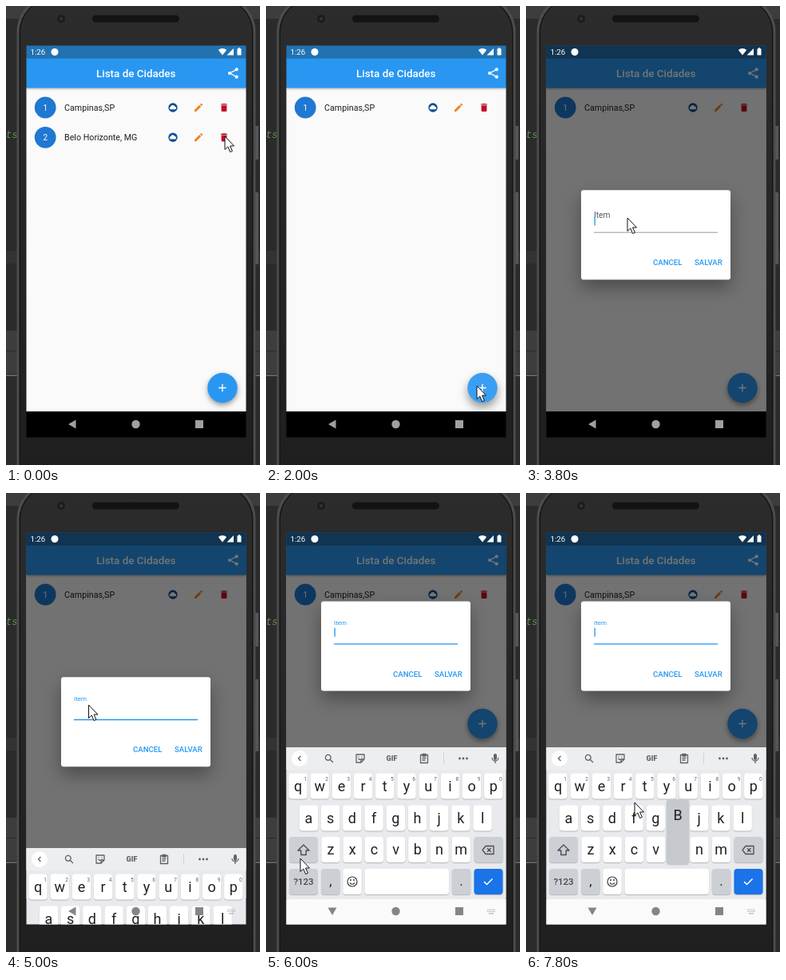
These frames come from a looping animation (318 px wide and 574 px high, 8 s). An HTML page with a canvas:

```html
<!DOCTYPE html>
<html lang="pt">
<head>
<meta charset="utf-8">
<style>
html, body { margin: 0; width: 100%; height: 100%; overflow: hidden; background: #2b2b2b; }
canvas { display: block; width: 318px; height: 574px; }
</style>
</head>
<body>
<canvas id="stage"></canvas>
<script>
const W = 318, H = 574, LOOP = 8000, STEP = 200;
const LEFT = 25, WIDTH = 277;
const BLUE = '#2196f3', BAR = '#2997f1';
const canvas = document.getElementById('stage');
const ctx = canvas.getContext('2d');
const dpr = window.devicePixelRatio || 1;
canvas.width = W * dpr;
canvas.height = H * dpr;

// Each key is [time, value...]; eased between keys.
const pointer = [
  [800, 274, 163], [1400, 258, 320], [1800, 254, 470], [2000, 264, 475],
  [2200, 264, 475], [3200, 127, 265], [3800, 127, 265], [4800, 103.5, 265],
  [5000, 103.5, 265], [6000, 43, 457], [6200, 43, 457], [7200, 188, 448],
  [7600, 188, 448], [7800, 136, 387]
];
const keyboardDrop = [[4600, 222], [4800, 200], [5000, 126], [5200, 25], [5400, 0]];
const bodyInset = [[5000, 0], [5600, 1]];

function track(keys, t) {
  if (t <= keys[0][0]) return keys[0].slice(1);
  for (let i = 1; i < keys.length; i++) {
    const a = keys[i - 1], b = keys[i];
    if (t <= b[0]) {
      const u = (t - a[0]) / (b[0] - a[0]), e = u * u * (3 - 2 * u);
      return a.slice(1).map((v, k) => v + (b[k + 1] - v) * e);
    }
  }
  return keys[keys.length - 1].slice(1);
}

function rect(x, y, w, h, color, r = 0) {
  ctx.fillStyle = color;
  ctx.beginPath();
  ctx.roundRect(x, y, w, h, r);
  ctx.fill();
}

function disc(x, y, r, color) {
  ctx.fillStyle = color;
  ctx.beginPath();
  ctx.arc(x, y, r, 0, 7);
  ctx.fill();
}

function text(str, x, y, size, color, { weight = 400, align = 'left', family = 'Roboto, sans-serif', style = '' } = {}) {
  ctx.font = `${style} ${weight} ${size}px ${family}`;
  ctx.textAlign = align;
  ctx.textBaseline = 'alphabetic';
  ctx.fillStyle = color;
  ctx.fillText(str, x, y);
}

const centered = { align: 'center' };

function shape(path, x, y, color, { line = 0 } = {}) {
  ctx.save();
  ctx.translate(x, y);
  const p = new Path2D(path);
  if (line) {
    ctx.strokeStyle = color;
    ctx.lineWidth = line;
    ctx.lineJoin = 'round';
    ctx.stroke(p);
  } else {
    ctx.fillStyle = color;
    ctx.fill(p);
  }
  ctx.restore();
}

function withShadow(blur, dy, color, draw) {
  ctx.save();
  ctx.shadowBlur = blur * dpr;
  ctx.shadowOffsetY = dy * dpr;
  ctx.shadowColor = color;
  draw();
  ctx.restore();
}

function drawDesk() {
  rect(0, 0, W, H, '#2b2b2b');
  rect(0, 0, W, 16, '#3b3c3c');
  rect(0, 306, W, 16, '#353331');
  rect(0, 406, W, 54, '#3c3d3d');
  rect(0, 431, W, 1, '#2b2b2b');
  rect(0, 461, W, 2, '#606060');
  rect(312, 150, 4, 42, '#555657');
  rect(312, 233, 4, 90, '#555657');
  text('ts', 0, 165, 12, '#629155', { style: 'italic', family: '"Liberation Mono", monospace' });
}

function drawPhone() {
  rect(13.5, -13, 299, 640, '#4c4c4c', 45);
  rect(16.5, -10, 293, 640, '#141414', 43);
  const body = ctx.createLinearGradient(0, 0, 0, H);
  body.addColorStop(0, '#2c2c2c');
  body.addColorStop(1, '#1f1f1f');
  rect(18, -9, 290, 640, body, 42);
  disc(69, 16, 5, '#1c1c1c');
  disc(69, 16, 2, '#33363a');
  rect(108, 11.5, 109, 9, '#131313', 4.5);
}

function drawShare(x, y) {
  shape('M4.5-4.7L-4.5 0L4.5 4.7', x, y, '#fff', { line: 1.4 });
  for (const [dx, dy] of [[4.2, -4.7], [-4.5, 0], [4.2, 4.7]]) disc(x + dx, y + dy, 2.1, '#fff');
}

function drawRow(index, name, y) {
  disc(49.2, y, 13.4, '#1f78d1');
  text(index, 49.2, y + 3.5, 10, '#fff', centered);
  text(name, 73, y + 3.6, 10.7, '#202020');
  disc(209, y, 5.7, '#0d4f92');
  shape('M-3 2.2a1.7 1.7 0 0 1 0-3.3a3 3 0 0 1 5.5-.2a1.8 1.8 0 0 1 .4 3.5z', 209, y, '#fff');
  shape('M-5 5V2.9L1.2-3.3L3.3-1.2L-2.9 5zM1.9-4L3-5.1H3.8L5.1-3.8V-3L4-1.9z', 241, y, '#ee8322');
  shape('M-3.4-2.8H3.4V4A1.1 1.1 0 0 1 2.3 5.1H-2.3A1.1 1.1 0 0 1-3.4 4zM-4-4.5H-2L-1.4-5H1.4L2-4.5H4V-3.4H-4z', 273, y, '#c00d25');
}

function drawAddButton(t, inset) {
  const y = 477.5 - 189 * inset;
  const pressed = t >= 2000 && t < 2600;
  const color = pressed ? '#3a9ff2' : BAR;
  withShadow(pressed ? 11 : 6, pressed ? 6 : 3, 'rgba(0,0,0,.4)', () => disc(271, y, 18.7, color));
  rect(266.2, y - .7, 9.4, 1.4, '#fff');
  rect(270.2, y - 4.7, 1.4, 9.4, '#fff');
}

function drawApp(t, inset) {
  rect(LEFT, 102, WIDTH, 405, '#fafafa');
  withShadow(3, 1.5, 'rgba(0,0,0,.32)', () => rect(LEFT, 65, WIDTH, 37.4, BAR));
  rect(LEFT, 49, WIDTH, 16.7, '#2272b2');
  text('Lista de Cidades', 113, 89, 13.4, '#fff', { weight: 500 });
  drawShare(284.5, 84);
  drawRow('1', 'Campinas,SP', 127);
  if (t < 600) drawRow('2', 'Belo Horizonte, MG', 164.3);
  drawAddButton(t, inset);
}

function drawStatus() {
  text('1:26', 30.5, 61.3, 9.7, '#fff');
  disc(61, 57.5, 4.5, '#fff');
  shape('M0 4.5L-5.2-2A8 8 0 0 1 5.2-2z', 271, 57, '#fff');
  shape('M-4 4.5L4.5-4V4.5z', 280.5, 57, '#fff');
  rect(289.5, 53.3, 5, 8.2, '#fff', .6);
  rect(291, 52.3, 2, 1.2, '#fff');
}

function drawDialog(t, inset) {
  const y = 230.2 - 94.6 * inset;
  withShadow(22, 10, 'rgba(0,0,0,.34)', () => rect(69, y, 187, 112, '#fff', 3));
  if (t < 3800) text('Item', 85, y + 37.5, 10.7, '#666');
  else if (t < 4000) text('Item', 85, y + 35.2, 10.2, '#555');
  else text('Item', 85, y + 29.3, 8, BLUE);
  const focused = t >= 4000;
  rect(85, y + 52.6, 155, focused ? 1.4 : .8, focused ? BLUE : '#777');
  const caret = (t >= 3800 && t < 4200) || (t >= 5800 && t < 6600) || t >= 7800;
  if (caret) rect(85.5, y + 33.2, 1.3, 11, BLUE);
  text('CANCEL', 159, y + 94.2, 9.6, BLUE, { weight: 500 });
  text('SALVAR', 211, y + 94.2, 9.6, BLUE, { weight: 500 });
}

function drawKey(x, y, w, color) {
  withShadow(1, 1, 'rgba(0,0,0,.22)', () => rect(x, y, w, 32, color, 4));
}

function drawToolbar() {
  const gray = '#5f6368';
  const line = { line: 1.3 };
  disc(42, 332, 10, '#fff');
  shape('M1.5-3L-1.5 0L1.5 3', 42, 332, gray, line);
  shape('M2.2-1.2A3.4 3.4 0 1 1-4.6-1.2A3.4 3.4 0 1 1 2.2-1.2M1.3 1.3L5 5', 79, 332, gray, line);
  shape('M-5-5H5V1L1 5H-5zM5 1H1V5M-2.5 0Q0 3 2.5 0M-2-2.5V-1.5M2-2.5V-1.5', 118, 332, gray, line);
  text('GIF', 157.5, 335.3, 9, gray, { align: 'center', weight: 900 });
  shape('M-4.5-4.5H4.5V5.5H-4.5zM-2-5.5H2V-3H-2zM-2.5-.5H2.5M-2.5 2H1.5', 198, 332, gray, line);
  rect(222, 325, 1, 14, '#d0d3d7');
  for (const dx of [-4.5, 0, 4.5]) disc(247 + dx, 332, 1.4, gray);
  rect(285, 326, 4, 8, gray, 2);
  shape('M-4-1A4 4 0 0 0 4-1M0 3V6', 287, 332, gray, line);
}

function drawKeyboard(t, drop) {
  const caps = t >= 6200 && t < 7800;
  const dark = '#ccd0d5', ink = '#202124';
  ctx.save();
  ctx.translate(0, drop);
  rect(LEFT, 318, WIDTH, 222, '#e8eaed');
  rect(LEFT, 318, WIDTH, 28, '#eceef0');
  drawToolbar();

  const rows = [['qwertyuiop', 40, 350.5], ['asdfghjkl', 53.5, 390.5], ['zxcvbnm', 81, 430]];
  rows.forEach(([letters, start, y], row) => {
    [...letters].forEach((letter, i) => {
      const x = start + i * 27.2;
      drawKey(x - 11.7, y, 23.4, '#fff');
      text(caps ? letter.toUpperCase() : letter, x, y + 22.3, 18, ink, centered);
      if (!row) text((i + 1) % 10, x + 9, y + 9, 6.5, '#5f6368', centered);
    });
  });

  drawKey(29, 430, 36, dark);
  shape('M0-6.5L7 .5H3.2V6H-3.2V.5H-7z', 47, 446.5, '#4a4d51', { line: caps ? 0 : 1.4 });
  drawKey(260.5, 430, 36, dark);
  shape('M-7 0L-3-5H7V5H-3zM-1-2.3L3.6 2.3M3.6-2.3L-1 2.3', 278, 446.5, '#4a4d51', { line: 1.3 });

  drawKey(29, 470, 36, dark);
  text('?123', 47, 490, 11.5, '#44474b', { align: 'center', weight: 500 });
  drawKey(69, 470, 23.5, dark);
  text(',', 81, 491, 17, ink, centered);
  drawKey(96.3, 470, 23.5, '#fff');
  shape('M6 0A6 6 0 1 1-6 0A6 6 0 1 1 6 0M-3 1.5Q0 5 3 1.5', 108, 486, '#3c4043', { line: 1.2 });
  disc(106, 484, 1, '#3c4043');
  disc(110, 484, 1, '#3c4043');
  drawKey(123.5, 470, 105.5, '#fff');
  drawKey(232.8, 470, 23.5, dark);
  text('.', 244.5, 491, 17, ink, centered);
  drawKey(260.5, 470, 36, '#1a73e8');
  shape('M-5 0L-1.5 3.5L5.5-3.5', 278, 486, '#fff', { line: 1.5 });

  if (t >= 7600) {
    withShadow(2, 1, 'rgba(0,0,0,.2)', () => rect(176, 383, 28, 81, '#c5c8cd', 4));
    text('B', 190, 409, 18, ink, centered);
  }
  rect(LEFT, 508, WIDTH, 32, '#fafafa');
  ctx.restore();
}

function drawNav(t) {
  const gray = t < 4800 ? '#a0a0a0' : '#858585';
  const back = t < 5400 ? 'M-5 0L4.5-5.5V5.5z' : 'M0 5L-5.5-4.5H5.5z';
  shape(back, 83, 523, gray);
  disc(162.5, 523, 5.2, gray);
  rect(237, 518, 10, 10, gray);
  if (t < 4800) return;
  ctx.globalAlpha = .6;
  for (let row = 0; row < 2; row++)
    for (let i = 0; i < 5; i++) rect(277 + i * 2.1, 520.5 + row * 2.3, 1.3, 1.3, gray);
  rect(279, 525.2, 6, 1.2, gray);
  ctx.globalAlpha = 1;
}

function drawPointer(x, y) {
  const arrow = 'M0 0V16.5L3.8 13L6.6 19.6L9.4 18.4L6.6 12H11.5z';
  shape(arrow, x, y, '#fff');
  shape(arrow, x, y, '#111', { line: 1 });
}

function render(t) {
  ctx.setTransform(dpr, 0, 0, dpr, 0, 0);
  const [inset] = track(bodyInset, t);
  const [drop] = track(keyboardDrop, t);
  drawDesk();
  drawPhone();
  ctx.save();
  ctx.beginPath();
  ctx.rect(25.5, 49.5, 275, 490);
  ctx.clip();
  drawApp(t, inset);
  if (t >= 2200) rect(LEFT, 49, WIDTH, 458, 'rgba(0,0,0,.54)');
  drawStatus();
  if (t >= 2200) drawDialog(t, inset);
  rect(LEFT, 507, WIDTH, 33, '#000');
  if (t >= 4800) drawKeyboard(t, drop);
  drawNav(t);
  ctx.restore();
  drawPointer(...track(pointer, t));
}

const start = performance.now();
function tick() {
  const t = (performance.now() - start) % LOOP;
  render(Math.floor(t / STEP) * STEP);
  requestAnimationFrame(tick);
}
tick();
</script>
</body>
</html>
```
